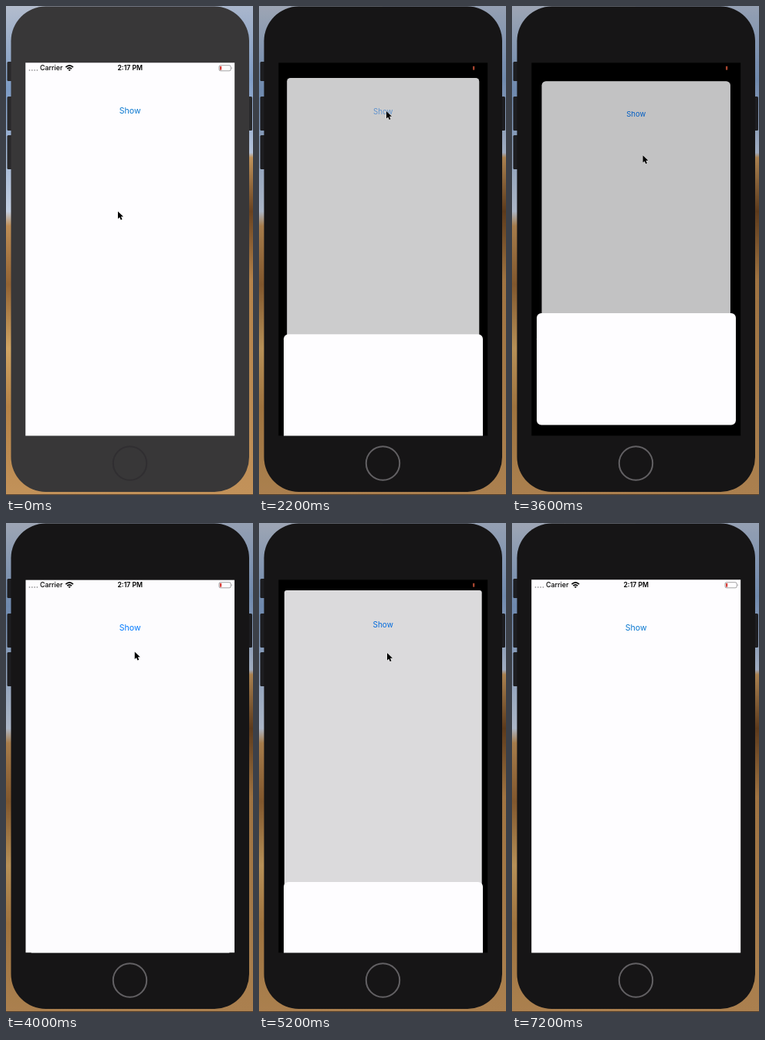
Write an HTML page that moves like this. It is 320 by 632 pixels and loops after 7.8 s.

```html
<!DOCTYPE html>
<html lang="en">
<head>
<meta charset="utf-8">
<title>Sheet presentation</title>
<style>
  html, body { margin: 0; width: 100%; height: 100%; overflow: hidden; }
  svg { display: block; width: 100vw; height: 100vh; }
  text { font-family: Inter, "Liberation Sans", sans-serif; }
</style>
</head>
<body>
<svg viewBox="0 0 320 632">
  <defs>
    <linearGradient id="leftSide" x2="0" y2="1">
      <stop offset="0" stop-color="#b3bccd"/>
      <stop offset=".17" stop-color="#7d9cc6"/>
      <stop offset=".42" stop-color="#c3cfe2"/>
      <stop offset=".45" stop-color="#bd8d55"/>
      <stop offset=".57" stop-color="#936333"/>
      <stop offset=".7" stop-color="#d0a463"/>
      <stop offset=".82" stop-color="#b58347"/>
      <stop offset="1" stop-color="#c2925a"/>
    </linearGradient>
    <linearGradient id="rightSide" x2="0" y2="1">
      <stop offset="0" stop-color="#a9b6cc"/>
      <stop offset=".15" stop-color="#809dc6"/>
      <stop offset=".3" stop-color="#b5c3da"/>
      <stop offset=".31" stop-color="#c0925a"/>
      <stop offset=".42" stop-color="#69421f"/>
      <stop offset=".56" stop-color="#b5834a"/>
      <stop offset="1" stop-color="#c2925a"/>
    </linearGradient>
    <rect id="area" x="25.2" y="73.2" width="271.2" height="482.4"/>
    <clipPath id="screen"><use href="#area"/></clipPath>
  </defs>

  <rect width="160" height="632" fill="url(#leftSide)"/>
  <rect x="160" width="160" height="632" fill="url(#rightSide)"/>
  <rect y="631" width="320" height="1" fill="#2b2320" opacity=".7"/>
  <rect id="shade" width="320" height="632"/>

  <g id="buttons">
    <rect x="1.5" y="72" width="8" height="25" rx="1.5"/>
    <rect x="1.5" y="117" width="8" height="44" rx="1.5"/>
    <rect x="1.5" y="167" width="8" height="44" rx="1.5"/>
    <rect x="311" y="117" width="8" height="44" rx="1.5"/>
  </g>
  <rect id="body" x="6.5" y=".5" width="308.5" height="627.5" rx="45"/>
  <circle id="home" cx="160.5" cy="591" r="21.7" fill="none" stroke-width="2"/>

  <g clip-path="url(#screen)">
    <use href="#area"/>
    <g id="card">
      <rect id="page" x="25" y="73" width="271.5" height="483" fill="#fefdff"/>
      <text id="show" x="160.7" y="138.7" font-size="10.6" text-anchor="middle">Show</text>
      <rect id="dim" x="25" y="73" width="271.5" height="483"/>
    </g>
    <path d="M30.5 83h10" stroke="#000" stroke-width="1.8" stroke-linecap="round" stroke-dasharray="0 3.3" opacity=".35"/>
    <text x="44" y="83.4" font-size="8.9" font-weight="500">Carrier</text>
    <g fill="none" stroke="#000" stroke-width="1.7">
      <path d="M77.4 79.2Q82.2 74.7 87 79.2"/>
      <path d="M79.3 81.2Q82.2 78.5 85.1 81.2"/>
    </g>
    <path d="M80.6 82.4Q82.2 81.2 83.8 82.4L82.2 84Z"/>
    <text x="160.8" y="83.4" font-size="8.7" font-weight="600" text-anchor="middle">2:17 PM</text>
    <rect x="276" y="76.7" width="15.2" height="7.1" rx="1.9" fill="none" stroke="#000" stroke-opacity=".45" stroke-width=".8"/>
    <path d="M292.2 78.9Q293.7 80.2 292.2 81.6Z" opacity=".45"/>
    <rect id="charge" x="277" y="77.7" width="2.3" height="5.1" rx=".8"/>
    <rect id="sheet" x="32" y="397" width="258" height="144.5" rx="6" fill="#fefdff"/>
  </g>

  <path id="cursor" d="M0 0V11.2L2.6 8.8L4.4 13L6.5 12.1L4.7 8H8.3Z" stroke="#fff" stroke-width=".9" stroke-linejoin="round" paint-order="stroke"/>
</svg>
<script>
const LOOP = 7800, STEP = 200, LAST = 7200, FOCUS = 2200;
const SLIDE = 450, FADE = 500;

// Each visit of the sheet: when it is called up and sent away.
const visits = [{ show: 2000, hide: 3680 }, { show: 4330, hide: 5125 }];

// The pointer rests between glides; bend pushes the path sideways.
const home = { x: 145, y: 265.5 };
const glides = [
  { at: 400, time: 1300, x: 165, y: 136, bend: 63 },
  { at: 2400, time: 1100, x: 169.5, y: 193 },
  { at: 3700, time: 600, x: 164, y: 140 },
  { at: 4600, time: 600, x: 166, y: 168 },
  { at: 5400, time: 1100, x: 65, y: -11.5 }
];

const clamp = v => Math.max(0, Math.min(1, v));
const mix = (a, b, k) => a + (b - a) * k;
const smooth = k => k * k * (3 - 2 * k);
const easeOut = k => 1 - (1 - k) ** 3;
const slide = (t, from) => easeOut(clamp((t - from) / SLIDE));

const $ = id => document.getElementById(id);
const set = (id, attrs) => {
  for (const key in attrs) $(id).setAttribute(key, attrs[key]);
};

function pointerAt(t) {
  return glides.reduce((p, { at, time, x, y, bend = 0 }) => {
    const k = smooth(clamp((t - at) / time));
    return { x: mix(p.x, x, k) + bend * 2 * k * (1 - k), y: mix(p.y, y, k) };
  }, home);
}

function drawPhone(t) {
  const active = t >= FOCUS;
  set("body", { fill: active ? "#161516" : "#383738" });
  set("buttons", { fill: active ? "#1d1d20" : "#29292b" });
  set("home", { stroke: active ? "#626063" : "#302e31" });
  set("shade", { opacity: active ? .12 : 0 });
}

function drawScreen(t) {
  const p = visits.reduce((sum, v) => sum + slide(t, v.show) - slide(t, v.hide), 0);
  const press = visits.find(v => t >= v.show && t < v.show + FADE);
  const radius = 6 * p;
  set("card", { transform: `translate(160.75 314.5) scale(${1 - .1 * p}) translate(-160.75 -314.5)` });
  set("page", { rx: radius });
  set("dim", { rx: radius, opacity: .235 * p });
  set("show", {
    // The safe area collapses once the card leaves the status bar.
    transform: `translate(0 ${p > .1 ? -14.5 : 0})`,
    fill: p > 0 ? "#007aff" : "#0a78d0",
    opacity: press ? mix(.2, 1, (t - press.show) / FADE) : 1
  });
  set("charge", { fill: p > .1 ? "#a8452f" : "#d8413c" });
  set("sheet", { transform: `translate(0 ${159 * (1 - p)})` });
}

function draw(now) {
  const t = Math.min(LAST, Math.floor(now % LOOP / STEP) * STEP);
  const { x, y } = pointerAt(t);
  drawPhone(t);
  drawScreen(t);
  set("cursor", { transform: `translate(${x} ${y}) scale(.85)` });
}

const start = performance.now();
function tick() {
  draw(performance.now() - start);
  requestAnimationFrame(tick);
}
tick();
</script>
</body>
</html>
```
